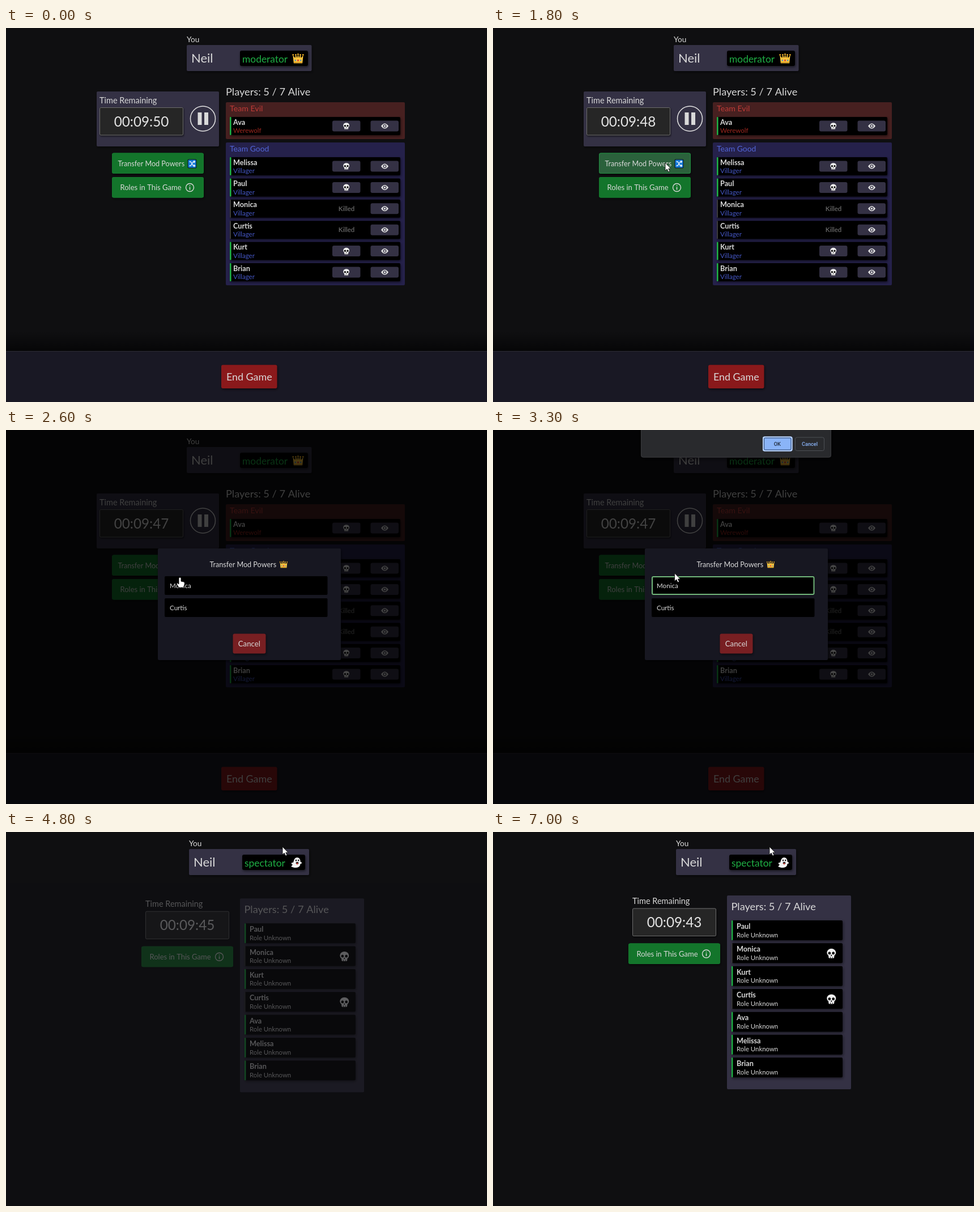
Animation, 849 px wide and 660 px high, one loop 7200 ms. Source, as an HTML page with a canvas:

```html
<!DOCTYPE html>
<html lang="en">
<head>
<meta charset="utf-8">
<title>Moderator transfer</title>
<style>
html, body { margin: 0; width: 100%; height: 100%; overflow: hidden; background: #0f0f11; }
canvas { display: block; }
</style>
</head>
<body>
<canvas id="stage" width="849" height="660"></canvas>
<script>
const ctx = document.getElementById('stage').getContext('2d');
const LOOP = 7200, STEP = 100;
const OPEN = 1900, CONFIRM = 3200, SWITCH = 4500;
const BG = '#0f0f11', PANEL = '#343144', LIGHT = '#d9d9d9', GREEN = '#13752b', LIME = '#1fb045';
const GOOD = ['Melissa', 'Paul', 'Monica', 'Curtis', 'Kurt', 'Brian'];
const SPECTATED = ['Paul', 'Monica', 'Kurt', 'Curtis', 'Ava', 'Melissa', 'Brian'];
const isDead = name => name === 'Monica' || name === 'Curtis';

// Cursor stops: time, x, y
const PATH = [
  [100, 640, 540], [1400, 304, 238], [2400, 304, 238], [2600, 307, 260],
  [3100, 311, 266], [3200, 311, 266], [3900, 484, 28], [4100, 484, 28], [4300, 488, 26]
];

const clamp = v => Math.max(0, Math.min(1, v));
const smooth = v => { v = clamp(v); return v * v * (3 - 2 * v); };

function box(x, y, w, h, fill, { r = 2, stroke, line = 1, shadow = 0 } = {}) {
  ctx.save();
  if (shadow) {
    ctx.shadowColor = 'rgba(0,0,0,.55)';
    ctx.shadowBlur = shadow;
    ctx.shadowOffsetX = 1;
    ctx.shadowOffsetY = 2;
  }
  ctx.beginPath();
  ctx.roundRect(x, y, w, h, r);
  ctx.fillStyle = fill;
  ctx.fill();
  ctx.restore();
  if (stroke) {
    ctx.beginPath();
    ctx.roundRect(x + line / 2, y + line / 2, w - line, h - line, r);
    ctx.strokeStyle = stroke;
    ctx.lineWidth = line;
    ctx.stroke();
  }
}

// y is the middle of the capital letters
function text(str, x, y, size, color = LIGHT, { weight = 400, align = 'left', font = 'Lato' } = {}) {
  ctx.font = `${weight} ${size}px ${font}, sans-serif`;
  ctx.textAlign = align;
  ctx.fillStyle = color;
  ctx.fillText(str, x, y + size * 0.36);
}

function disc(x, y, rx, ry, fill) {
  ctx.beginPath();
  ctx.ellipse(x, y, rx, ry, 0, 0, 7);
  ctx.fillStyle = fill;
  ctx.fill();
}

function lines(parts, color, width) {
  ctx.beginPath();
  for (const part of parts) {
    part.forEach(([x, y], i) => i ? ctx.lineTo(x, y) : ctx.moveTo(x, y));
  }
  ctx.strokeStyle = color;
  ctx.lineWidth = width;
  ctx.stroke();
}

function placed(x, y, s, draw) {
  ctx.save();
  ctx.translate(x, y);
  ctx.scale(s, s);
  draw();
  ctx.restore();
}

function skull(x, y, s, hole = '#000') {
  placed(x, y, s, () => {
    disc(0, -1.5, 8, 7, '#f0f0f0');
    box(-5, 2, 10, 6.5, '#f0f0f0', { r: 2 });
    disc(-3.4, -0.5, 2.4, 2.5, hole);
    disc(3.4, -0.5, 2.4, 2.5, hole);
    disc(0, 3.4, 1, 1.2, hole);
    lines([[[-1.8, 6], [-1.8, 8.6]], [[1.8, 6], [1.8, 8.6]]], hole, 0.9);
  });
}

function eye(x, y) {
  ctx.beginPath();
  ctx.moveTo(x - 6.5, y);
  ctx.quadraticCurveTo(x, y - 9, x + 6.5, y);
  ctx.quadraticCurveTo(x, y + 9, x - 6.5, y);
  ctx.fillStyle = '#e2e2e2';
  ctx.fill();
  disc(x, y, 3, 3, PANEL);
  disc(x, y, 1.7, 1.7, '#e2e2e2');
}

function crown(x, y, s) {
  placed(x, y, s, () => {
    ctx.beginPath();
    [[-9, -6], [-5, -1], [-4, -7], [-1.6, -1], [0, -8], [1.6, -1], [4, -7], [5, -1], [9, -6], [7.5, 8], [-7.5, 8]]
      .forEach(([px, py]) => ctx.lineTo(px, py));
    ctx.closePath();
    ctx.fillStyle = '#fcc63c';
    ctx.fill();
    for (const px of [-8.6, -4, 0, 4, 8.6]) disc(px, px % 8 ? -6.5 : -7.6, 1.3, 1.3, '#f6b52a');
    lines([[[-7.5, 6.5], [7.5, 6.5]]], '#c98a1c', 1.2);
    disc(0, 3, 1.6, 1.6, '#d83b3b');
    disc(-4.6, 3, 1.2, 1.2, '#3b88c8');
    disc(4.6, 3, 1.2, 1.2, '#3b88c8');
  });
}

function ghost(x, y) {
  placed(x, y, 1, () => {
    ctx.beginPath();
    ctx.moveTo(-9, 7);
    ctx.bezierCurveTo(-3, 3, -6, -9, 2, -9);
    ctx.bezierCurveTo(9, -9, 8, 1, 7, 5);
    ctx.bezierCurveTo(5, 10, -3, 10, -9, 7);
    ctx.fillStyle = '#f2f2f2';
    ctx.fill();
    disc(-6, 1.5, 2.2, 1.8, '#f2f2f2');
    disc(8, 0.5, 2, 1.8, '#f2f2f2');
    disc(0, -4, 1.2, 1.6, '#111');
    disc(4.2, -4, 1.2, 1.6, '#111');
    disc(2, 0.8, 2.4, 2, '#111');
    disc(2, 2, 1.4, 1.4, '#e0483e');
  });
}

function shuffle(x, y) {
  box(x - 8, y - 8, 16, 16, '#101418', { r: 2 });
  box(x - 7, y - 7, 14, 14, '#1279d8', { r: 1.5 });
  lines([
    [[x - 5, y - 3.5], [x - 2.5, y - 3.5], [x + 2, y + 3.5], [x + 5, y + 3.5]],
    [[x - 5, y + 3.5], [x - 2.5, y + 3.5], [x + 2, y - 3.5], [x + 5, y - 3.5]],
    [[x + 3, y - 5.5], [x + 5, y - 3.5], [x + 3, y - 1.5]],
    [[x + 3, y + 1.5], [x + 5, y + 3.5], [x + 3, y + 5.5]]
  ], '#eef4fa', 1.3);
}

function info(x, y) {
  ctx.beginPath();
  ctx.arc(x, y, 7, 0, 7);
  ctx.strokeStyle = LIGHT;
  ctx.lineWidth = 1.4;
  ctx.stroke();
  lines([[[x, y - 1], [x, y + 4]], [[x, y - 4], [x, y - 2.4]]], LIGHT, 1.5);
}

function youCard(x, w, role, chipX, chipW) {
  text('You', x, 20.5, 13.6);
  box(x, 30, w, 46, PANEL, { shadow: 5 });
  text('Neil', x + 8, 53.5, 22);
  box(chipX, 40, chipW, 27, '#000', { r: 3, shadow: 4 });
  text(role, chipX + 4, 54.5, 17.4, LIME);
}

function timer(x, y, left) {
  text('Time Remaining', x, y - 12.5, 14.5);
  box(x, y, 148, 49.5, '#262626', { stroke: '#6c6c6c', shadow: 3 });
  text('00:09:' + left, x + 74, y + 25, 24.3, '#e4e4e4', { align: 'center' });
}

function greenButton(x, y, label, gap, hover) {
  box(x, y, 162, 36.5, hover ? '#2b613c' : GREEN, { r: 3, stroke: hover ? '#1f8f3f' : '#15792e', shadow: 4 });
  text(label, x + gap, y + 18.5, gap < 12 ? 12.6 : 13);
}

function rolesButton(x, y, hover) {
  greenButton(x, y, 'Roles in This Game', 14.5, hover);
  info(x + 137.5, y + 18.5);
}

function modRow(y, name, role, color) {
  const dead = isDead(name);
  box(395, y - 16, 301, 32, '#000', { shadow: 4 });
  box(395, y - 16, dead ? 2 : 2.6, 32, dead ? '#3c3c3c' : LIME, { r: 1 });
  text(name, 401, y - 7, 12.7, LIGHT, { weight: 700 });
  text(role, 401, y + 8, 11.5, color);
  if (dead) {
    text('Killed', 601, y, 11.6, '#7c7c7c', { align: 'center' });
  } else {
    box(576, y - 9.5, 49.5, 19, PANEL, { r: 3 });
    skull(600.7, y, 0.68);
  }
  box(643.5, y - 9.5, 49.5, 19, PANEL, { r: 3 });
  eye(668.5, y);
}

function moderatorPage(left, hovered) {
  youCard(319, 220.5, 'moderator', 413, 120);
  crown(515.5, 54, 1.02);

  box(160, 112, 216, 97, PANEL, { shadow: 4 });
  timer(165, 140, left);
  ctx.beginPath();
  ctx.arc(347.5, 160, 22, 0, 7);
  ctx.strokeStyle = '#e2e2e2';
  ctx.lineWidth = 1.5;
  ctx.stroke();
  box(338.5, 149, 7, 22, LIGHT, { r: 0 });
  box(350, 149, 7, 22, LIGHT, { r: 0 });

  greenButton(187, 220.5, 'Transfer Mod Powers', 10.5, hovered === 1);
  shuffle(328.5, 239.5);
  rolesButton(187, 263, hovered === 2);

  text('Players: 5 / 7 Alive', 388, 112.5, 18.2);
  box(388, 131, 316, 65, '#472020');
  text('Team Evil', 395, 142, 14.2, '#bd3a36');
  modRow(173, 'Ava', 'Werewolf', '#9f271f');
  box(388, 202, 316, 252, '#25214b');
  text('Team Good', 395, 213, 13.9, '#5164d6');
  GOOD.forEach((name, i) => modRow(244 + i * 37.4, name, 'Villager', '#4557c6'));

  const shade = ctx.createLinearGradient(0, 535, 0, 570);
  shade.addColorStop(0, 'rgba(0,0,0,0)');
  shade.addColorStop(1, 'rgba(0,0,0,.6)');
  ctx.fillStyle = shade;
  ctx.fillRect(0, 535, 849, 35);
  box(0, 570, 849, 90, '#191824', { r: 0 });
  box(0, 570, 849, 1, '#2c2b35', { r: 0 });
  box(380, 594.5, 98.5, 41.5, '#8a191b', { r: 3, shadow: 4 });
  text('End Game', 429.3, 615.5, 17.9, LIGHT, { align: 'center' });
}

function modal(alpha, picked) {
  ctx.globalAlpha = alpha;
  box(0, 0, 849, 660, 'rgba(0,0,0,.71)', { r: 0 });
  box(268, 209, 323, 197, '#171721', { shadow: 5 });
  text('Transfer Mod Powers', 359.5, 237.5, 12.6);
  crown(490, 237.5, 0.72);
  ['Monica', 'Curtis'].forEach((name, i) => {
    const y = 258 + i * 39;
    const stroke = picked && !i ? '#72b77b' : undefined;
    box(280, y, 287.5, 33, '#000', { stroke, line: 2 });
    text(name, 289, y + 16.5, 11.6);
  });
  box(400.5, 359.5, 58, 35, '#781f22', { r: 3, shadow: 4 });
  text('Cancel', 429.3, 377, 13.2, LIGHT, { align: 'center' });
  ctx.globalAlpha = 1;
}

function confirmBar() {
  const label = { weight: 500, align: 'center', font: 'Roboto' };
  box(261, -6, 336, 54.5, '#292a2d', { r: 4, stroke: '#38393c', shadow: 8 });
  box(476, 11.5, 52.5, 26, '#8ab4f8', { r: 3, stroke: '#c3d9fb', line: 1.5 });
  box(478, 13.5, 48.5, 22, '#8ab4f8', { r: 2, stroke: '#31496f' });
  text('OK', 501.8, 24.5, 9.2, '#202a3a', label);
  box(533, 12.5, 52, 24.5, '#292a2d', { r: 3, stroke: '#4d5055' });
  text('Cancel', 559, 24.5, 9.2, '#8ab4f8', label);
}

function spectatorPage(left, shown) {
  const dy = 8 * (1 - shown);
  ctx.save();
  ctx.translate(0, dy);
  timer(246, 134.5, left);
  rolesButton(239, 196.5, false);
  box(413, 112, 219, 342, PANEL);
  text('Players: 5 / 7 Alive', 420.5, 131.5, 18.2);
  SPECTATED.forEach((name, i) => {
    const y = 156 + i * 40.35, dead = isDead(name);
    box(421, y, 196, 35, '#000', { shadow: 5 });
    box(421, y, dead ? 1.6 : 2.4, 35, dead ? '#3c3c3c' : LIME, { r: 1 });
    text(name, 430, y + 10.5, 12.7, LIGHT, { weight: 700 });
    text('Role Unknown', 430, y + 25.5, 11.4);
    if (dead) skull(597.3, y + 18, 1);
  });
  ctx.restore();

  ctx.globalAlpha = 1 - shown;
  box(0, 90, 849, 570, BG, { r: 0 });
  ctx.globalAlpha = 1;
  youCard(323, 212, 'spectator', 417, 111);
  ghost(512, 54);
}

function cursorAt(t) {
  const next = PATH.findIndex(stop => stop[0] > t);
  if (next === 0) return null;
  if (next < 0) return PATH[PATH.length - 1].slice(1);
  const [t0, x0, y0] = PATH[next - 1], [t1, x1, y1] = PATH[next];
  const k = smooth((t - t0) / (t1 - t0));
  return [x0 + (x1 - x0) * k, y0 + (y1 - y0) * k];
}

function cursor([x, y], hand) {
  const path = new Path2D(hand
    ? 'M-2 1 Q0-1 2 1 V7 L7 8 Q9 9 8 13 L6 18 H-2 L-6 11 Q-5 9 -2 12 Z'
    : 'M0 0 V14 L3.2 11 L5.6 16 L8 15 L5.8 10.2 H10 Z');
  placed(x, y, 1, () => {
    ctx.fillStyle = '#fff';
    ctx.fill(path);
    ctx.strokeStyle = '#111';
    ctx.lineWidth = 0.9;
    ctx.stroke(path);
  });
}

function secondsLeft(t) {
  if (t < SWITCH) return 50 - (t >= 400) - (t >= 1400) - (t >= 2400);
  return 45 - (t >= 5300) - (t >= 6300);
}

function hoveredButton([x, y]) {
  if (x < 187 || x > 349) return 0;
  return y > 220 && y < 257 ? 1 : y > 263 && y < 300 ? 2 : 0;
}

function draw(t) {
  box(0, 0, 849, 660, BG, { r: 0 });
  const left = secondsLeft(t), spot = cursorAt(t);
  if (t < SWITCH) {
    moderatorPage(left, spot && t < OPEN ? hoveredButton(spot) : 0);
    if (t >= OPEN) modal(clamp((t - OPEN + 100) / 300), t > 2600);
    if (t >= CONFIRM) confirmBar();
  } else {
    spectatorPage(left, smooth((t - SWITCH) / 750));
  }
  if (spot) cursor(spot, t >= 2600 && t < CONFIRM);
}

const start = performance.now();
function tick() {
  const t = (performance.now() - start) % LOOP;
  draw(Math.floor(t / STEP) * STEP);
  requestAnimationFrame(tick);
}
tick();
</script>
</body>
</html>
```
